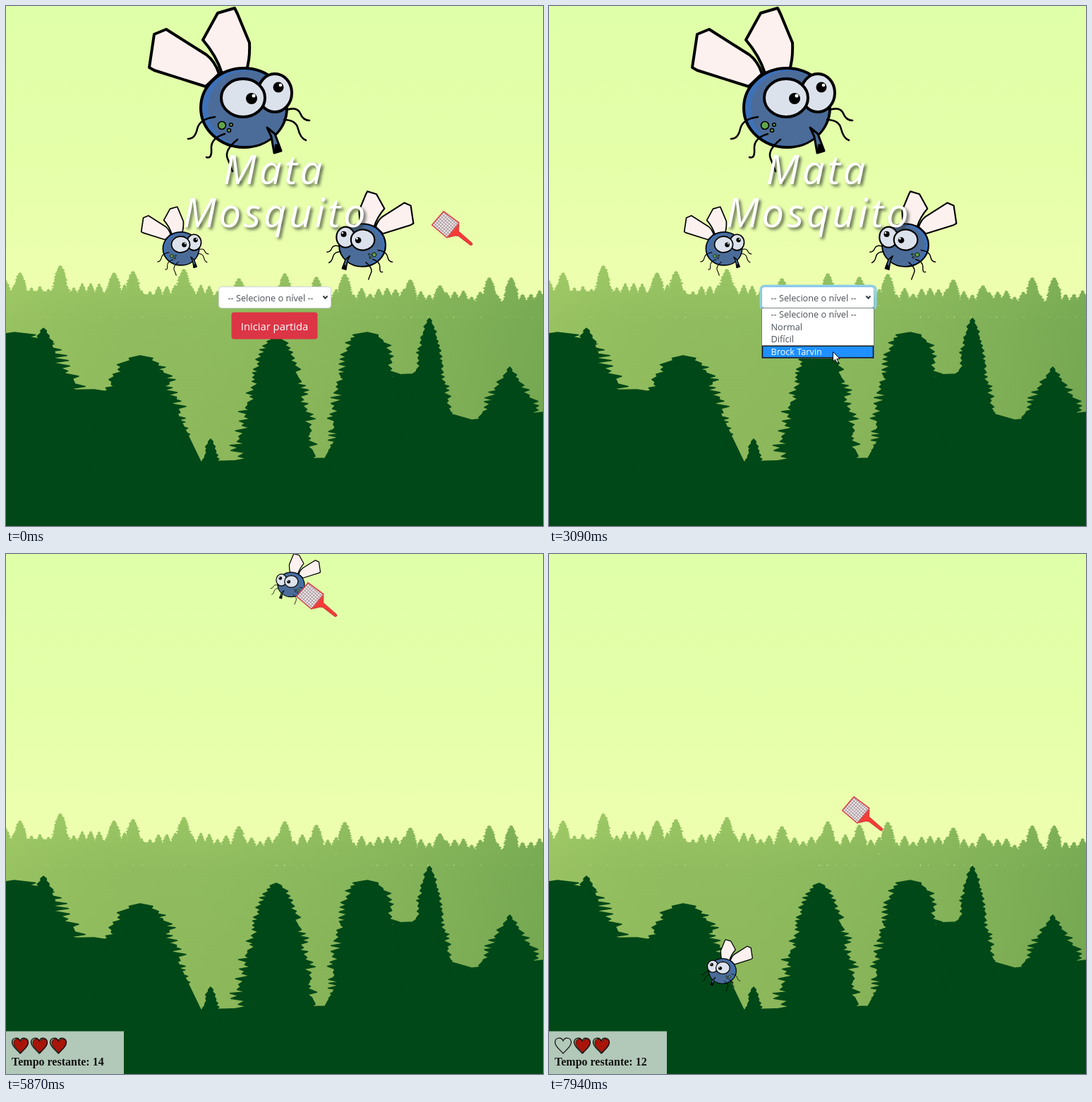
Recreate the animation shown at these times as an HTML page. Size 761x736 px, loop 8000 ms.

```html
<!DOCTYPE html>
<html lang="pt">
<head>
<meta charset="utf-8">
<title>Mata Mosquito</title>
<style>
html, body { margin: 0; height: 100%; overflow: hidden; background: #004817; }
svg { display: block; }
text { font-family: "Open Sans", "Noto Sans", sans-serif; white-space: pre; }
#title { font-size: 56px; font-style: italic; letter-spacing: 4px; fill: #fff; filter: drop-shadow(3px 3px 2px rgba(40,50,40,.75)); }
.opt { font-size: 12.7px; fill: #495057; }
#time { font: bold 16px "Liberation Serif", "Noto Serif", serif; fill: #111; }
</style>
</head>
<body>
<svg width="761" height="736" viewBox="0 0 761 736">
<defs>
  <linearGradient id="sky" x2="0" y2="1">
    <stop stop-color="#dfffa8"/><stop offset=".3" stop-color="#e5ffa9"/><stop offset=".53" stop-color="#edffaf"/>
  </linearGradient>
  <linearGradient id="haze" gradientUnits="userSpaceOnUse" x1="0" y1="370" x2="0" y2="650">
    <stop stop-color="#9bc765"/><stop offset=".28" stop-color="#91bd60"/><stop offset="1" stop-color="#8eb85b"/>
  </linearGradient>
  <linearGradient id="shade" gradientUnits="userSpaceOnUse" x1="0" y1="0" x2="761" y2="0">
    <stop stop-color="#b0d468" stop-opacity=".25"/><stop offset=".35" stop-color="#78a850" stop-opacity=".05"/>
    <stop offset="1" stop-color="#4f8c40" stop-opacity=".4"/>
  </linearGradient>
  <pattern id="mesh" width="3.4" height="3.4" patternUnits="userSpaceOnUse" patternTransform="rotate(42)">
    <rect width="3.4" height="3.4" fill="#f1e6e8"/><path d="M0 0H3.4M0 0V3.4" stroke="#857a80" stroke-width="1.1"/>
  </pattern>
  <path id="heart" d="M12 23C8 18 0 13 .5 6.5C1 1 9-1.5 12 5C15-1.5 23 1 23.5 6.5C24 13 16 18 12 23Z"/>
  <g id="fly" stroke="#000" stroke-linejoin="round" stroke-linecap="round">
    <path fill="#fdf1ef" stroke-width="4" d="M302 96Q296 78 284 69L227 33L210 40L203 87L210 91L283 114Z
      M306 95Q298 70 279 48L300 10L324 3L328 11L345 52Q346 74 341 90Z"/>
    <ellipse cx="337" cy="144" rx="61" ry="56" fill="#3d72ba" stroke-width="4"/>
    <ellipse cx="341" cy="145" rx="55" ry="53" fill="#4b6c99" stroke="none"/>
    <path fill="none" stroke-width="2.6" d="M296 157Q274 160 271 174T258 188M310 181Q290 187 291 202T284 214
      M328 189Q309 204 314 216T321 234M397 147Q413 142 417 152T430 162M394 161Q411 161 414 174T425 190"/>
    <g fill="#dce2eb" stroke-width="4"><ellipse cx="381" cy="123" rx="24" ry="27"/><ellipse cx="336" cy="130" rx="31" ry="27"/></g>
    <path fill="#4b6c99" stroke-width="3" d="M370 172L381 181L390 205L380 208L376 185Z"/>
    <path d="M382 196L387 196L390 205L380 208Z"/>
    <g stroke="none"><circle cx="348" cy="131" r="8"/><circle cx="386" cy="115" r="7.5"/>
      <g fill="#fff"><circle cx="351" cy="127" r="2.5"/><circle cx="389" cy="112" r="2.3"/></g></g>
    <g fill="#62a548" stroke-width="1.6"><circle cx="306" cy="169" r="5.5"/><circle cx="319" cy="168" r="2.3"/><circle cx="316" cy="176" r="2.5"/></g>
  </g>
</defs>

<rect width="761" height="736" fill="url(#sky)"/>
<path class="far" fill="url(#haze)"/>
<path class="far" fill="url(#shade)"/>
<path id="near" fill="#004817" stroke="#004817" stroke-width="1.5" stroke-linejoin="round"/>

<g id="menu">
  <use href="#fly" id="big"/><use href="#fly" id="left"/><use href="#fly" id="right"/>
  <g id="title" text-anchor="middle"><text x="380" y="252">Mata</text><text x="382" y="313">Mosquito</text></g>
  <rect id="ring" x="300" y="396" width="163" height="33.5" rx="5.5" fill="none" stroke="#8fd0e0" stroke-width="3.2"/>
  <rect id="box" x="301.5" y="397.5" width="159" height="30" rx="4" fill="#fff"/>
  <text id="picked" class="opt" x="314.5" y="417.5"></text>
  <path d="M449.5 410.5l3 3.2l3-3.2" fill="none" stroke="#343a40" stroke-width="2"/>
  <rect id="button" x="319.5" y="433.5" width="122" height="38" rx="4" stroke-width="6" paint-order="stroke"/>
  <text x="380.5" y="459" font-size="14.8" fill="#fff" text-anchor="middle">Iniciar partida</text>
  <g id="list">
    <rect x="301.5" y="427.5" width="159" height="71" fill="#fff" stroke="#7b8288"/>
    <rect id="bar" x="302.5" width="157" height="16.5" fill="#1e90ff" stroke="#101820" stroke-width="1.5"/>
  </g>
</g>

<g id="game">
  <use href="#fly" id="target"/>
  <rect y="675.5" width="167" height="61" fill="#b2c8b9"/>
  <g id="lives"></g>
  <text id="time" x="8" y="724"></text>
</g>

<g id="swatter">
  <path d="M17 .7L.7 20L22 38L39 17Z" fill="url(#mesh)" stroke="#d8404a" stroke-width="1.6" stroke-linejoin="round"/>
  <path d="M39 19L38.5 29L41 31L57.5 45.5Q59 49 55 48.5L38 35.5L34 35L24 37.5Z" fill="#f93a36" stroke="#b52a34" stroke-width=".8"/>
</g>
<g fill="#fff" stroke="#000">
  <path id="arrow" d="M.5.5V14L3.6 11.2L6 16.3L8.2 15.3L5.9 10.4H10Z"/>
  <path id="hand" d="M-1.2 11V1.2Q.2-1.2 1.6 1.2V6.5Q3 5.2 4.1 7Q5.5 6 6.4 7.8Q8 7 8.3 9V13Q8 16 6.5 18H0Q-2 14-4.3 11Q-4.2 8.6-1.2 11Z"/>
</g>
</svg>
<script>
const $ = id => document.getElementById(id);
const show = (id, on) => { $(id).style.display = on ? "" : "none"; };
const place = (id, x, y) => $(id).setAttribute("transform", `translate(${x} ${y})`);
const putFly = (id, x, y, s, dir) =>
  $(id).setAttribute("transform", `translate(${x} ${y}) scale(${s * dir} ${s}) translate(-337 -143)`);

function make(tag, parent, attrs) {
  const el = document.createElementNS("http://www.w3.org/2000/svg", tag);
  for (const k in attrs) el.setAttribute(k, attrs[k]);
  return parent.appendChild(el);
}

// Scenery: trees of random branches; a low power gives a broad crown
let seed = 11;
const rnd = () => (seed = seed * 16807 % 2147483647) / 2147483647;
const path = pts => "M" + pts.map(p => p.map(v => v.toFixed(1))).join("L") + "Z";

function tree(x, top, base, half, power, step) {
  const side = dir => {
    const pts = [[x, top]];
    for (let y = top + step / 2; y < base; y += step * (.7 + rnd() * .6)) {
      const w = dir * half * ((y - top) / (base - top)) ** power;
      pts.push([x + w * (.85 + rnd() * .3), y], [x + w * (.68 + rnd() * .25), y + step * .45]);
    }
    return [...pts, [x + dir * half, base]];
  };
  return path([...side(-1), ...side(1).reverse()]);
}

// Same winding as the trees, so overlaps stay filled
const ground = line => path([[0, 740], ...line, [761, 740]].reverse());

let far = ground([[0, 402], [365, 413], [440, 418], [455, 430], [761, 424]]);
for (let x = 0; x < 770; x += 12)
  far += tree(x, 388 + x * .018 + rnd() * 12, 440, 15, .6, 4);
for (const [x, top] of [[20, 377], [77, 367], [153, 377], [180, 375], [252, 372], [330, 385],
  [395, 378], [440, 383], [480, 379], [573, 387], [615, 395], [685, 384], [716, 384]])
  far += tree(x, top, top + 45, 15, .5, 4);
document.querySelectorAll(".far").forEach(e => e.setAttribute("d", far));

// x, top, base, half width, power
const near = [
  [12, 462, 560, 108, .4], [53, 456, 500, 20, .6], [190, 495, 660, 84, .4], [290, 613, 665, 14, .5],
  [383, 466, 660, 64, .5], [512, 462, 660, 60, .3], [600, 442, 600, 33, .6], [714, 511, 600, 60, .9]
];
$("near").setAttribute("d", near.map(n => tree(...n, 7)).join("") +
  ground([[0, 545], [125, 543], [235, 560], [276, 645], [452, 640], [480, 590], [552, 522], [600, 520], [632, 578], [660, 586], [761, 575]]));

putFly("big", 337, 143, 1, 1);
putFly("left", 248, 343, .42, 1);
putFly("right", 505, 338, .54, -1);

const levels = ["-- Selecione o nível --", "Normal", "Difícil", "Brock Tarvin"];
const ROW = 17.5;
const options = levels.map((name, i) => {
  const el = make("text", $("list"), { class: "opt", x: 314.5, y: 441.3 + ROW * i });
  el.textContent = name;
  return el;
});

const fills = [0, 1, 2].map(i => {
  const g = make("g", $("lives"), { transform: `translate(${8 + 27 * i} 684)` });
  const full = make("g", g, {});
  make("use", full, { href: "#heart", fill: "#7d8d70" });
  make("use", full, { href: "#heart", fill: "#a91409", stroke: "#180402", "stroke-width": .8, transform: "translate(2.6 1.3) scale(.89 .93)" });
  make("use", g, { href: "#heart", fill: "none", stroke: "#0b0b0b", "stroke-width": 1.2 });
  return full;
});

// Pointer stops: time, x, y
const stops = [
  [0, 603, 310], [210, 603, 310], [980, 443, 421], [1300, 443, 421], [1910, 407, 456], [2140, 407, 457],
  [2370, 404, 475], [2690, 402, 489], [3400, 402, 489], [3790, 397, 462], [4980, 397, 462], [5100, 303, 357],
  [5790, 411, 60], [5930, 411, 60], [6500, 312, 550], [6720, 312, 550], [7180, 489, 327], [7490, 590, 72],
  [7600, 600, 72], [7940, 415, 363], [8001, 415, 363]
];
function pointer(t) {
  const i = stops.findIndex(s => s[0] > t);
  const [t0, x0, y0] = stops[i - 1], [t1, x1, y1] = stops[i];
  const f = (t - t0) / (t1 - t0);
  return [x0 + (x1 - x0) * f, y0 + (y1 - y0) * f];
}

const START = 4720, CLOCK = 4760, LOST = 7760;
// from, until, x, y, scale, direction
const flies = [
  [5510, 5920, 404, 43, .31, -1], [6260, 6660, 328, 571, .31, 1],
  [7010, LOST, 605, 34, .235, 1], [LOST, 8000, 246, 590, .316, -1]
];

function drawMenu(t, y, open, hover) {
  const focused = t >= 1050 && t < 4550;
  show("ring", focused);
  show("list", open);
  $("box").setAttribute("stroke", focused ? "#80bdff" : "#ced4da");
  $("picked").textContent = levels[t < 3240 ? 0 : 3];
  $("button").setAttribute("fill", hover ? "#c82333" : "#dc3545");
  $("button").setAttribute("stroke", t >= 4550 ? "rgba(225,83,97,.6)" : "none");
  const row = Math.min(3, Math.max(0, Math.floor((y - 428) / ROW)));
  $("bar").setAttribute("y", 428.7 + ROW * row);
  options.forEach((o, i) => { o.style.fill = i === row ? "#fff" : ""; });
}

function drawGame(t) {
  const fly = flies.find(f => t >= f[0] && t < f[1]);
  show("target", fly);
  if (fly) putFly("target", ...fly.slice(2));
  fills[0].style.display = t < LOST ? "" : "none";
  $("time").textContent = "Tempo restante: " + (15 - Math.max(0, Math.floor((t - CLOCK) / 1000)));
}

function draw(t) {
  const [x, y] = pointer(t), inGame = t >= START;
  const open = t >= 1120 && t < 3240;
  const inside = (l, top, r, b) => !inGame && x > l && x < r && y > top && y < b;
  const onButton = !open && inside(319, 433, 442, 472);
  const onSelect = open || inside(301, 397, 461, 428);
  show("menu", !inGame);
  show("game", inGame);
  show("hand", onButton);
  show("arrow", onSelect);
  show("swatter", !onButton && !onSelect);
  place("hand", x, y);
  place("arrow", x, y);
  place("swatter", x, y - 20);
  if (inGame) drawGame(t);
  else drawMenu(t, y, open, onButton);
}

function loop(now) {
  draw(now % 8000);
  requestAnimationFrame(loop);
}
requestAnimationFrame(loop);
</script>
</body>
</html>
```
